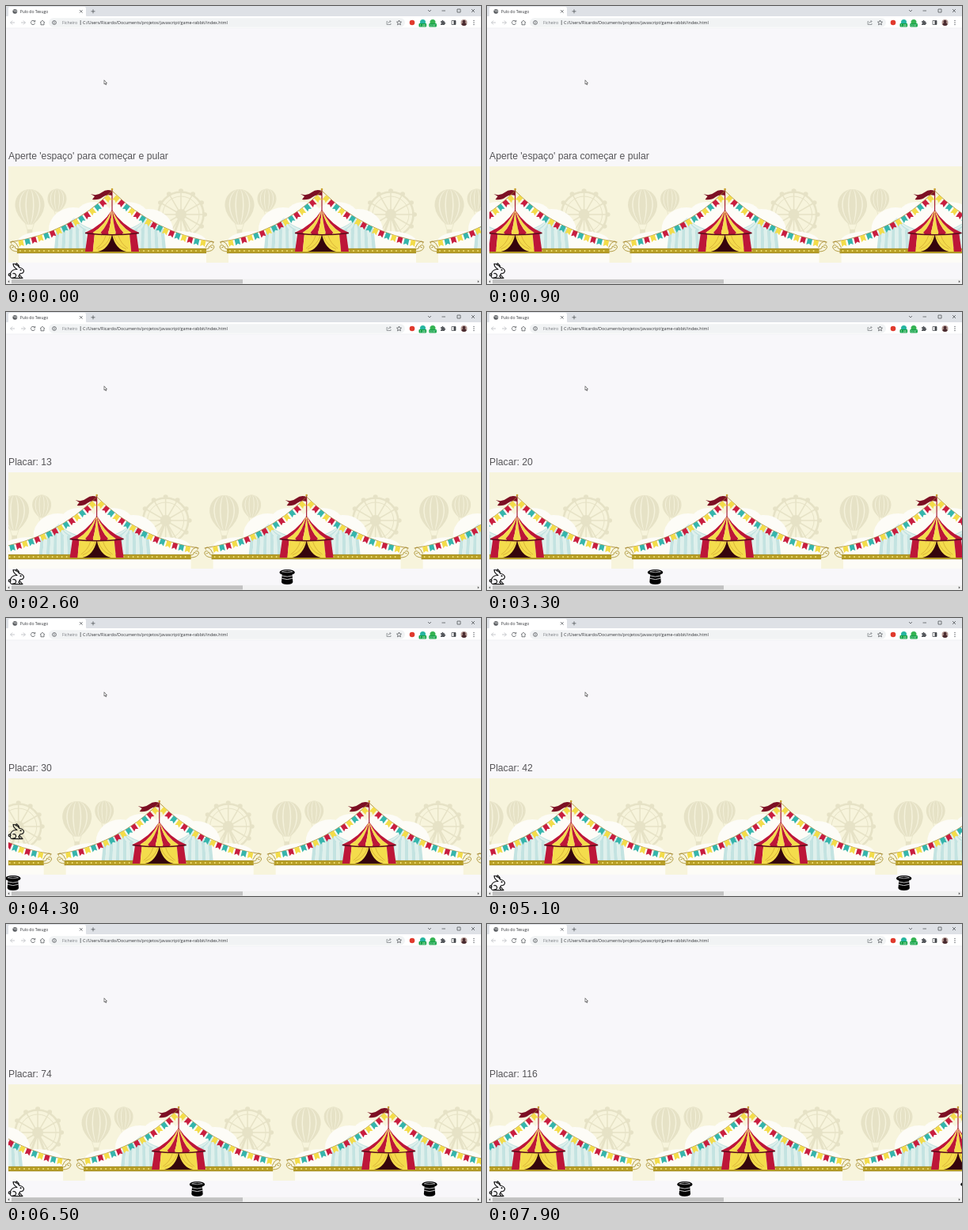
Animation of 600x352 px, one loop 8 s. Source, as an HTML page:

```html
<!DOCTYPE html>
<html lang="pt">
<head>
<meta charset="utf-8">
<title>Pulo do Texugo</title>
<style>
  html, body { margin: 0; width: 100%; height: 100%; overflow: hidden; background: #f8f7fa; }
  svg { display: block; }
  .ui { font: 5.4px "Open Sans", "Noto Sans", sans-serif; fill: #303236; }
  #label { font: 12.2px "Liberation Sans", Arial, sans-serif; fill: #565558; }
  .line { fill: none; stroke: #55585c; stroke-width: .8; }
</style>
</head>
<body>
<svg width="600" height="352" viewBox="0 0 600 352">
  <defs>
    <clipPath id="band"><rect x="3" y="203" width="597" height="122"/></clipPath>
    <g id="tile"></g>
    <g id="hat">
      <path d="M-6.300 6L-7.200 16.500Q-6.500 19.500 0 19.500T7.200 16.500L6.300 6Z"/>
      <ellipse cy="4.200" rx="9.700" ry="3.700"/>
      <path d="M-6.800 3.400Q0 .2 6.800 3.400Q0 5.200 -6.800 3.400Z" fill="none" stroke="#f4f4f6" stroke-width=".6"/>
      <path d="M-6.600 8.400Q0 10.800 6.600 8.400M-6.800 11.800Q0 14.500 6.800 11.800" fill="none" stroke="#f4f4f6" stroke-width=".8"/>
    </g>
  </defs>

  <!-- browser window -->
  <rect width="600" height="14" fill="#dee1e6"/>
  <path d="M1 14Q3 14 3 11V3Q3 1 5 1H99Q101 1 101 3V11Q101 14 103 14Z" fill="#fff"/>
  <rect y="13" width="600" height="15" fill="#fff"/>
  <path d="M0 28H600" stroke="#e9eaed" stroke-width=".6"/>
  <rect x="54" y="15.3" width="450" height="11.4" rx="5.7" fill="#f1f3f4"/>
  <circle cx="11.3" cy="6.8" r="2.9" fill="#55585c"/>
  <path d="M9.4 5.4l1.8.6-.6 1.5M12 4.8l1 1.4-.4 1.8" fill="none" stroke="#fff" stroke-width=".7"/>
  <g class="ui">
    <text x="17.7" y="8.8" style="font-size:5px">Pulo do Texugo</text>
    <text x="71" y="23" style="font-size:5.2px;fill:#72767b">Ficheiro</text>
    <text x="97" y="23">C:/Users/Ricardo/Documents/projetos/javascript/game-rabbit/index.html</text>
  </g>
  <g class="line">
    <path d="M93 5l3.6 3.6M96.600 5L93 8.600M107.500 6.800h5M110 4.300v5"/>
    <path d="M533 5l2 2 2-2M550.500 6h4.500M570 4h4v4h-4zM588 4l4 4M592 4l-4 4"/>
    <path d="M11 21H5.600m2.500-2.500L5.600 21l2.500 2.500M19 21h5.400m-2.500-2.500l2.500 2.500-2.500 2.500" stroke="#b9bcc0"/>
    <path d="M36 19.200a2.600 2.600 0 1 0 .6 2.400M36.800 17.900v2h-2"/>
    <path d="M43 21l3-2.700 3 2.700M44 20.500v3.300h4v-3.300"/>
    <circle cx="61" cy="21" r="2.400"/>
    <path d="M61 20.500v1.800M61 19.300v.6M94.200 18v6"/>
    <path d="M482 19.500h-1v4h5v-1.500M482.500 22q.5-2.500 3.500-2.500m-1.400-1.500l1.500 1.500-1.500 1.500" stroke="#85888c"/>
    <path d="M496.500 18l.9 2 2.100.2-1.600 1.500.5 2.200-1.900-1.200-1.900 1.200.5-2.200-1.600-1.500 2.100-.2z"/>
    <path d="M563 18.500h5v5h-5z"/>
  </g>
  <path d="M565.500 18.500h2.500v5h-2.500z" fill="#45484c"/>
  <path d="M549 19.300h1.500q0-1.500 1-1.500t1 1.500h1.500v1.500q1.300 0 1.300 1t-1.300 1V24H549v-1.500q1.200 0 1.200-.9t-1.200-.8z" fill="#55585c"/>
  <circle cx="513" cy="21" r="3.300" fill="#e03a2d"/>
  <circle cx="526.500" cy="20.500" r="3.500" fill="#26b5a0"/>
  <circle cx="539" cy="20.500" r="3.500" fill="#35b353"/>
  <g fill="#12a347">
    <rect x="521.500" y="22" width="9.600" height="4.600" rx="1"/>
    <rect x="534.300" y="22" width="9.600" height="4.600" rx="1"/>
  </g>
  <g class="ui" style="font-size:3.600px;fill:#fff;text-anchor:middle">
    <text x="526.300" y="25.600">1.00</text><text x="539.100" y="25.600">0.97</text>
  </g>
  <circle cx="578.500" cy="21" r="4" fill="#b59a94"/>
  <path d="M575.300 23.500q.6-2 2-2.200a1.900 1.900 0 1 1 2.400 0q1.500.2 2 2.200-3 3-6.400 0z" fill="#4b2c30"/>
  <path d="M591 18.500v.1M591 21v.1M591 23.500v.1" stroke="#55585c" stroke-width="1.300" stroke-linecap="round"/>

  <path d="M124 93.800v5.200l1.200-1 .8 1.900.8-.4-.8-1.800h1.500z" fill="#fff" stroke="#333" stroke-width=".6"/>

  <!-- game -->
  <text id="label" x="3" y="194"></text>
  <g clip-path="url(#band)">
    <rect x="3" y="203" width="597" height="122" fill="#f7f4dc"/>
    <g id="scene"></g>
  </g>
  <g id="rabbit" fill="none" stroke="#111" stroke-width="1.100" stroke-linejoin="round" stroke-linecap="round">
    <circle cx="4.600" cy="340.300" r="1.400"/>
    <path d="M14 333.500Q8 333 5.800 338Q4 344.600 8 344.600H17.500Q18 342.800 15.800 342.500L17.800 338.800Q22.800 338.500 22.500 335Q21 331.500 17 331.200Q13 326.200 9 326.500Q9.200 330.500 14 333.500Z"/>
    <path d="M16.800 331Q16 327.500 13.500 325.800Q12 326.300 12.800 328M8.500 344Q13.500 344 12.500 340.200Q11.500 338 8.800 338.800M17.300 340.500L21 344.600H17.500"/>
    <circle cx="18.600" cy="334.300" r=".5" fill="#111"/>
  </g>
  <g id="hats"></g>

  <!-- scrollbar -->
  <rect y="345.800" width="600" height="6.200" fill="#f1f1f1"/>
  <rect x="7" y="346.300" width="292" height="5.200" fill="#c1c1c1"/>
  <path d="M4.200 347.300v3.200L2.200 348.900zM595.800 347.300v3.200l2-1.600z" fill="#606060"/>
</svg>

<script>
const $ = id => document.getElementById(id);
const PERIOD = 265, LOOP = 8000, STEP = 100;
const SCROLL = 0.10937, HAT_SPEED = 0.2037, HAT_START = 622;
const spawns = [1290, 4632, 6073, 7831];
const jumps = [4010, 7340], JUMP_TIME = 540, JUMP_HEIGHT = 65;

const path = (d, fill, extra = '') => `<path d="${d}" fill="${fill}" ${extra}/>`;
const stroke = (d, color, width) => path(d, 'none', `stroke="${color}" stroke-width="${width}"`);
const oval = (x, y, rx, ry, fill) => `<ellipse cx="${x}" cy="${y}" rx="${rx}" ry="${ry}" fill="${fill}"/>`;

function balloon(x, y, r) {
  const c = '#e6e2c6', base = y + r * 1.75;
  const gore = (k, fill) => path(`M${x - r * k} ${y}A${r * k} ${r * 1.05} 0 0 1 ${x + r * k} ${y}Q${x + r * k} ${y + r * .7} ${x + r * .25 * k} ${y + r * 1.35}h${-r * .5 * k}Q${x - r * k} ${y + r * .7} ${x - r * k} ${y}Z`, fill);
  return [1, .72, .64, .3, .22].map((k, i) => gore(k, i % 2 ? '#f5f2dc' : c)).join('') +
    stroke(`M${x - r * .3} ${y + r * 1.3}L${x - r * .15} ${base}M${x + r * .3} ${y + r * 1.3}L${x + r * .15} ${base}`, c, .7) +
    path(`M${x - r * .18} ${base - 1}h${r * .36}v${r * .28}h${-r * .36}z`, c);
}

function wheel(x, y) {
  const c = '#e6e2c6';
  let out = `<g fill="none" stroke="${c}"><circle cx="${x}" cy="${y}" r="28.500" stroke-width="2.600"/>` +
    `<circle cx="${x}" cy="${y}" r="23" stroke-width="1"/></g>`;
  for (let i = 0; i < 12; i++) {
    const a = i * Math.PI / 6, dx = Math.cos(a), dy = Math.sin(a);
    out += stroke(`M${x} ${y}l${dx * 28} ${dy * 28}`, c, 1.5) + oval(x + dx * 30, y + dy * 30, 3, 2.8, c);
  }
  return out + oval(x, y, 7, 7, c) + stroke(`M${x} ${y}l-15 42M${x} ${y}l15 42`, c, 3);
}

// Striped tent: walls flaring to the ground under concave roof wedges.
function tent(x, top, eave, base, half, n, colors) {
  let walls = '', roof = '';
  const mid = top + (eave - top) * .68;
  for (let i = 0; i < n; i++) {
    const a = (i / n * 2 - 1) * half, b = ((i + 1) / n * 2 - 1) * half, fill = colors[i % 2];
    walls += path(`M${x + a * .9} ${eave}H${x + b * .9}L${x + b} ${base}H${x + a}Z`, fill);
    roof += path(`M${x} ${top}Q${x + a * .36} ${mid} ${x + a} ${eave}q${(b - a) / 2} 4 ${b - a} 0Q${x + b * .36} ${mid} ${x} ${top}Z`, fill);
  }
  return walls + roof;
}

function bunting(side) {
  const colors = ['#f3dc4a', '#c81e40', '#36b5ac'];
  const px = t => 131 + side * ((1 - t) * t * 2 * 54 + t * t * 129);
  const py = t => 234 * (1 - t) ** 2 + 2 * t * (1 - t) * 288 + 299 * t * t;
  let out = stroke(`M131 234Q${131 + side * 54} 288 ${131 + side * 129} 299`, '#a5842e', .8);
  for (let i = 0; i < 16; i++) {
    const t = .07 + i * .056, e = .01;
    const angle = Math.atan2(side * (py(t + e) - py(t)), side * (px(t + e) - px(t))) * 180 / Math.PI;
    out += path('M-3 0H3V8L0 6L-3 8Z', colors[i % 3], `transform="translate(${px(t)} ${py(t)}) rotate(${angle})"`);
  }
  return out;
}

function curl(x, side) {
  const X = d => x + side * d;
  return stroke(`M${X(0)} 311Q${X(10)} 311 ${X(11)} 305Q${X(10)} 301 ${X(7)} 303T${X(9)} 306M${X(0)} 306Q${X(3)} 299 ${X(7)} 298Q${X(11)} 298 ${X(9)} 301M${X(1)} 308Q${X(5)} 308 ${X(5)} 304`, '#b6a04a', 1);
}

function curtain(side) {
  const X = d => 131 + side * d;
  return path(`M131 289H${X(13)}Q${X(15)} 299 ${X(22)} 305Q${X(24)} 311 ${X(18)} 311Q${X(4)} 308 131 289Z`, '#f4dc4c') +
    stroke(`M${X(2)} 291Q${X(6)} 303 ${X(18)} 308M${X(8)} 291Q${X(11)} 301 ${X(20)} 307`, '#c89b2c', .6);
}

function buildTile() {
  const white = '#fdfcf7', red = '#bd1638', yellow = '#f4dc4c', dark = '#5a0c1b';
  const paleStripes = ['#c3e3e1', '#dff0ec'];
  const clouds = [[48, 298, 36, 13], [82, 283, 31, 28], [108, 268, 24, 20], [150, 268, 28, 20], [177, 284, 31, 27], [215, 298, 35, 13]];
  return balloon(27, 251.500, 18.5) + balloon(61.500, 244, 12) + wheel(218, 264) +
    clouds.map(c => oval(...c, white)).join('') +
    path('M13 298H250V325H13Z', white) +
    tent(83, 268, 283, 308, 25, 11, paleStripes) +
    tent(174, 268, 283, 308, 25, 11, paleStripes) +
    path('M11 307H250V313H11Z', '#b89f27') +
    stroke('M11 307.300H250M11 312.800H250', '#96801b', .6) +
    path('M15 310H249', 'none', 'stroke="#f4e47c" stroke-width="1.800" stroke-linecap="round" stroke-dasharray="0 6"') +
    curl(13, -1) + curl(249, 1) +
    tent(131, 258, 287, 311, 34, 7, [red, yellow]) +
    path('M131 289L112 311H150Z', '#35050d') + curtain(-1) + curtain(1) +
    stroke('M97 287.500Q131 292 165 287.500', dark, 1.4) +
    stroke('M131 231V260', '#a51c35', 1.2) +
    path('M131 234Q124 231 118 236T104 238L109 241L106 245Q114 246 119 242T131 240Z', '#7d1024') +
    oval(131, 232, 1.3, 1.3, '#c9a22c') +
    bunting(-1) + bunting(1);
}

function draw(t) {
  const shift = 3 - t * SCROLL % PERIOD;
  $('scene').setAttribute('transform', `translate(${shift})`);

  let score = 0;
  spawns.forEach((s, i) => {
    const age = t - s, x = age < 0 ? 700 : HAT_START - age * HAT_SPEED;
    if (age > 0) score += Math.floor(age / 100);
    $('hats').children[i].setAttribute('transform', `translate(${x} 325.500)`);
  });
  $('label').textContent = t < spawns[0] ? "Aperte 'espaço' para começar e pular" : 'Placar: ' + score;

  let lift = 0;
  for (const j of jumps) {
    const p = (t - j) / JUMP_TIME;
    if (p > 0 && p < 1) lift = JUMP_HEIGHT * Math.min(1, 2.4 * Math.min(p, 1 - p));
  }
  $('rabbit').setAttribute('transform', `translate(0 ${-lift})`);
}

$('tile').innerHTML = buildTile();
$('scene').innerHTML = [0, 1, 2, 3].map(i => `<use href="#tile" x="${i * PERIOD}"/>`).join('');
$('hats').innerHTML = spawns.map(() => '<use href="#hat"/>').join('');

const start = performance.now();
function frame() {
  const t = (performance.now() - start) % LOOP;
  draw(Math.floor(t / STEP) * STEP);
  requestAnimationFrame(frame);
}
frame();
</script>
</body>
</html>
```
